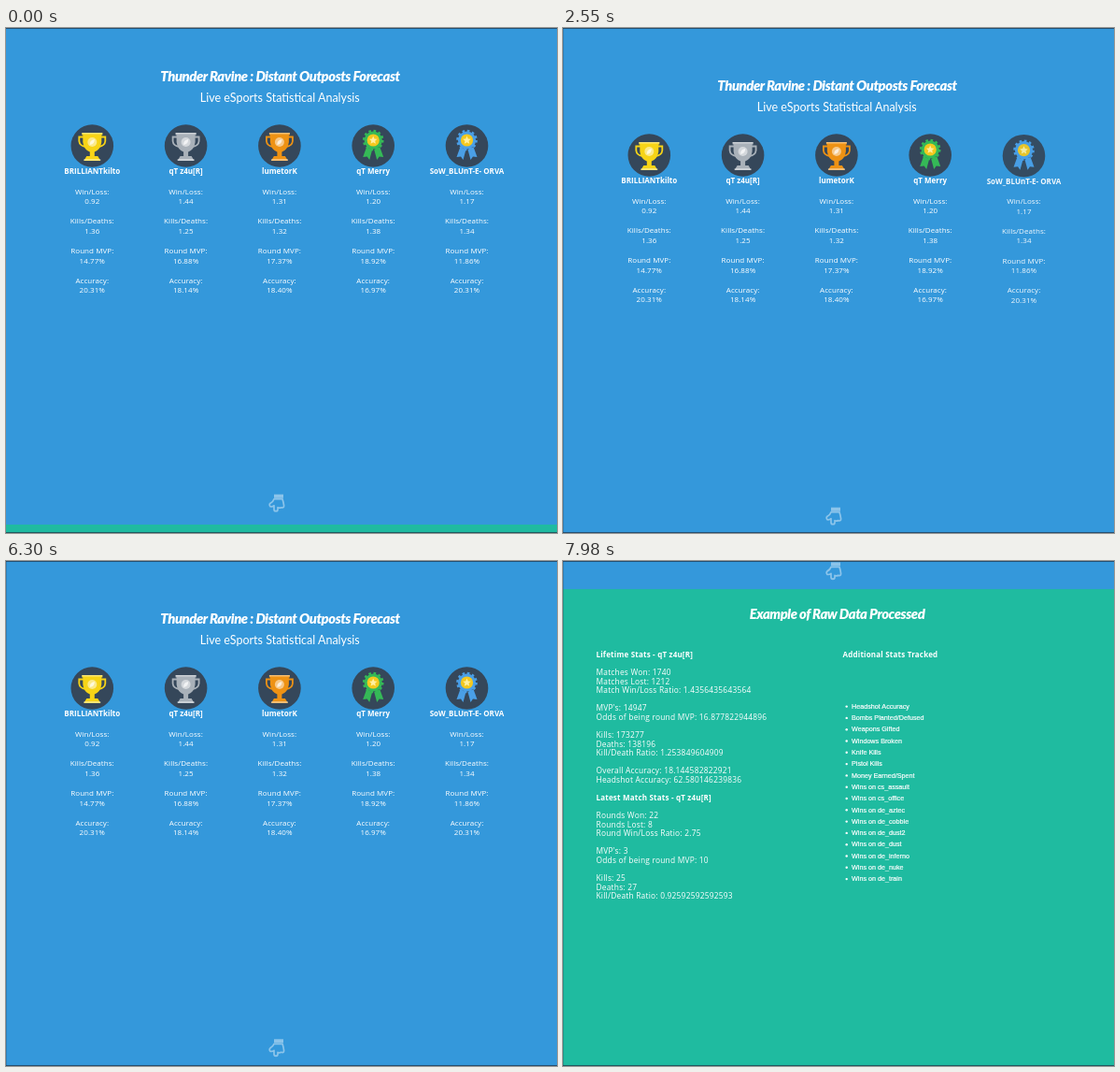
An HTML page that plays this animation: 590 px wide and 540 px high, repeating every 8 s.

```html
<!DOCTYPE html>
<html lang="en">
<head>
<meta charset="utf-8">
<title>Forecast</title>
<style>
  html, body { margin: 0; width: 100%; height: 100%; overflow: hidden; background: #3498db; }
  svg { display: block; }
  text { fill: #fff; font: 8px "Open Sans", sans-serif; }
  .mid { text-anchor: middle; letter-spacing: .06px; }
  .script { font: italic 900 14.8px Lato, cursive; letter-spacing: -.45px; text-anchor: middle; }
  .sub { font: 12.5px Lato, sans-serif; text-anchor: middle; }
  .bold { font-weight: 700; letter-spacing: .2px; }
  .name { font-weight: 700; text-anchor: middle; }
  .raw { font-size: 8.4px; letter-spacing: .22px; }
  .item { font: 7.2px "Liberation Sans", Arial, sans-serif; stroke: #fff; stroke-width: .2px; }
</style>
</head>
<body>
<svg width="590" height="540" viewBox="0 0 590 540">
  <defs>
    <g id="trophy">
      <path d="M-9-9.5H-14V-5Q-13.5 0-7 1M9-9.5H14V-5Q13.5 0 7 1" fill="none" stroke="currentColor" stroke-width="1.8"/>
      <path d="M-10-13.5H10V-4Q9 4 2.5 6.5V11H6L9 16H-9L-6 11H-2.5V6.5Q-9 4-10-4Z" fill="currentColor"/>
      <path d="M-11-14H11V-11.5H-11Z" fill="currentColor"/>
      <path d="M-11-14H11V-12.5H-11ZM-9 14H9V16H-9Z" fill="#fff" opacity=".4"/>
      <circle cy="-4" r="5" fill="#fff" opacity=".5"/>
      <path d="M-2.5-1Q-3-6 2.5-7Q3-2-2.5-1Z" fill="#fff" opacity=".7"/>
    </g>
    <g id="rosette">
      <path d="M-7 1L-1 4-4 15-6.5 11.5-11 12ZM7 1L1 4 4 15 6.5 11.5 11 12Z" fill="currentColor"/>
      <circle cy="-6" r="9.6" fill="currentColor"/>
      <circle cy="-6" r="10" fill="none" stroke="currentColor" stroke-width="2.6" stroke-dasharray="2.6 2.64"/>
      <circle cy="-6" r="6.6" fill="#f4c81e"/>
      <path d="M0-10.5L1.3-7.6 4.3-7.3 2-5.2 2.7-2.2 0-3.8-2.7-2.2-2-5.2-4.3-7.3-1.3-7.6Z" fill="#fff0a0"/>
    </g>
  </defs>
  <g id="page">
    <rect width="590" height="541" fill="#3498db"/>
    <rect y="541" width="590" height="560" fill="#1fbba0"/>
    <text class="script" x="293.5" y="66.5">Thunder Ravine : Distant Outposts Forecast</text>
    <text class="sub" x="293.3" y="88.5">Live eSports Statistical Analysis</text>
    <g id="players"></g>
    <g id="hand" opacity=".43">
      <path d="M-3-9H7V-5H-3Z" fill="#fff"/>
      <path d="M-3-4H6Q7-1 7.6 3Q7.6 6 5 5Q2 6 1 5V7Q1 9-1 9Q-3 9-3 7V3Q-5 4.5-7 4Q-8.6 2-7 .5Q-4-1-3-4Z"
            fill="none" stroke="#fff" stroke-width="1.7" stroke-linejoin="round"/>
    </g>
    <text class="script" x="293.5" y="572.5">Example of Raw Data Processed</text>
    <g id="stats"></g>
  </g>
  <path d="M0 .5H590M0 539.5H590" stroke="#1e3246" stroke-opacity=".7"/>
  <path id="edge" d="M.5 0V540" stroke="#1e3246" stroke-opacity=".25"/>
</svg>
<script>
const LOOP = 8000, RELOAD = 30;
const get = id => document.getElementById(id);
const text = (cls, x, y, s) => `<text class="${cls}" x="${x}" y="${y}">${s}</text>`;

const labels = ["Win/Loss:", "Kills/Deaths:", "Round MVP:", "Accuracy:"];
const players = [
  ["BRILLIANTkilto", "trophy", "#f7d417", "0.92", "1.36", "14.77%", "20.31%"],
  ["qT z4u[R]", "trophy", "#a9b1b9", "1.44", "1.25", "16.88%", "18.14%"],
  ["lumetorK", "trophy", "#ee9214", "1.31", "1.32", "17.37%", "18.40%"],
  ["qT Merry", "rosette", "#35b957", "1.20", "1.38", "18.92%", "16.97%"],
  ["SoW_BLUnT-E- ORVA", "rosette", "#4a9fe6", "1.17", "1.34", "11.86%", "20.31%"]
];
get("players").innerHTML = players.map(([name, icon, color, ...values], i) => {
  const x = 92.3 + i * 100.3;
  const rows = labels.map((label, j) => {
    const y = 187.5 + j * 31.7;
    return text("mid", x, y, label) + text("mid", x, y + 10.6, values[j]);
  }).join("");
  return `<g><circle cx="${x}" cy="136" r="22.8" fill="#35475a"/>
    <use href="#${icon}" x="${x}" y="136" color="${color}"/>
    ${text("name", x, 166, name)}${rows}</g>`;
}).join("");

const rawLines = `Lifetime Stats - qT z4u[R]

Matches Won: 1740
Matches Lost: 1212
Match Win/Loss Ratio: 1.4356435643564

MVP's: 14947
Odds of being round MVP: 16.877822944896

Kills: 173277
Deaths: 138196
Kill/Death Ratio: 1.253849604909

Overall Accuracy: 18.144582822921
Headshot Accuracy: 62.580146239836

Latest Match Stats - qT z4u[R]

Rounds Won: 22
Rounds Lost: 8
Round Win/Loss Ratio: 2.75

MVP's: 3
Odds of being round MVP: 10

Kills: 25
Deaths: 27
Kill/Death Ratio: 0.92592592592593`.split("\n");
const wins = "cs_assault cs_office de_aztec de_cobble de_dust2 de_dust de_inferno de_nuke de_train";
const tracked = ["Headshot Accuracy", "Bombs Planted/Defused", "Weapons Gifted", "Windows Broken",
  "Knife Kills", "Pistol Kills", "Money Earned/Spent", ...wins.split(" ").map(m => "Wins on " + m)];
get("stats").innerHTML =
  rawLines.map((s, i) => text(s.includes("Stats") ? "bold" : "raw", 35.5, 614 + i * 9.56, s)).join("") +
  text("bold", 299.5, 614, "Additional Stats Tracked") +
  tracked.map((s, i) => {
    const y = 668.8 + i * 12.3;
    return `<circle cx="303.7" cy="${y - 2.3}" r="1.2" fill="#fff"/>` + text("item", 309, y, s);
  }).join("");

const columns = [...get("players").children];
const clamp = v => Math.min(1, Math.max(0, v));
const ease = p => .5 - .5 * Math.cos(Math.PI * clamp(p));

function draw(t) {
  const before = t < RELOAD;
  const scroll = before ? 10 : Math.max(0, (t - 7326) * .78);
  get("page").setAttribute("transform", `translate(0 ${-scroll})`);
  get("edge").style.display = before ? "none" : "";

  columns.forEach((column, i) => {
    const shown = before ? 1 : ease((t - 150 - i * 465) / 650);
    column.setAttribute("opacity", shown);
    column.setAttribute("transform", `translate(0 ${10 * (1 - shown)})`);
  });

  const bob = before ? -1 : Math.cos(2 * Math.PI * (t - 1615) / 814);
  get("hand").setAttribute("transform", `translate(290 ${520.2 + 2.5 * bob})`);
}

const start = performance.now();
function tick() {
  draw((performance.now() - start) % LOOP);
  requestAnimationFrame(tick);
}
draw(0);
tick();
</script>
</body>
</html>
```
